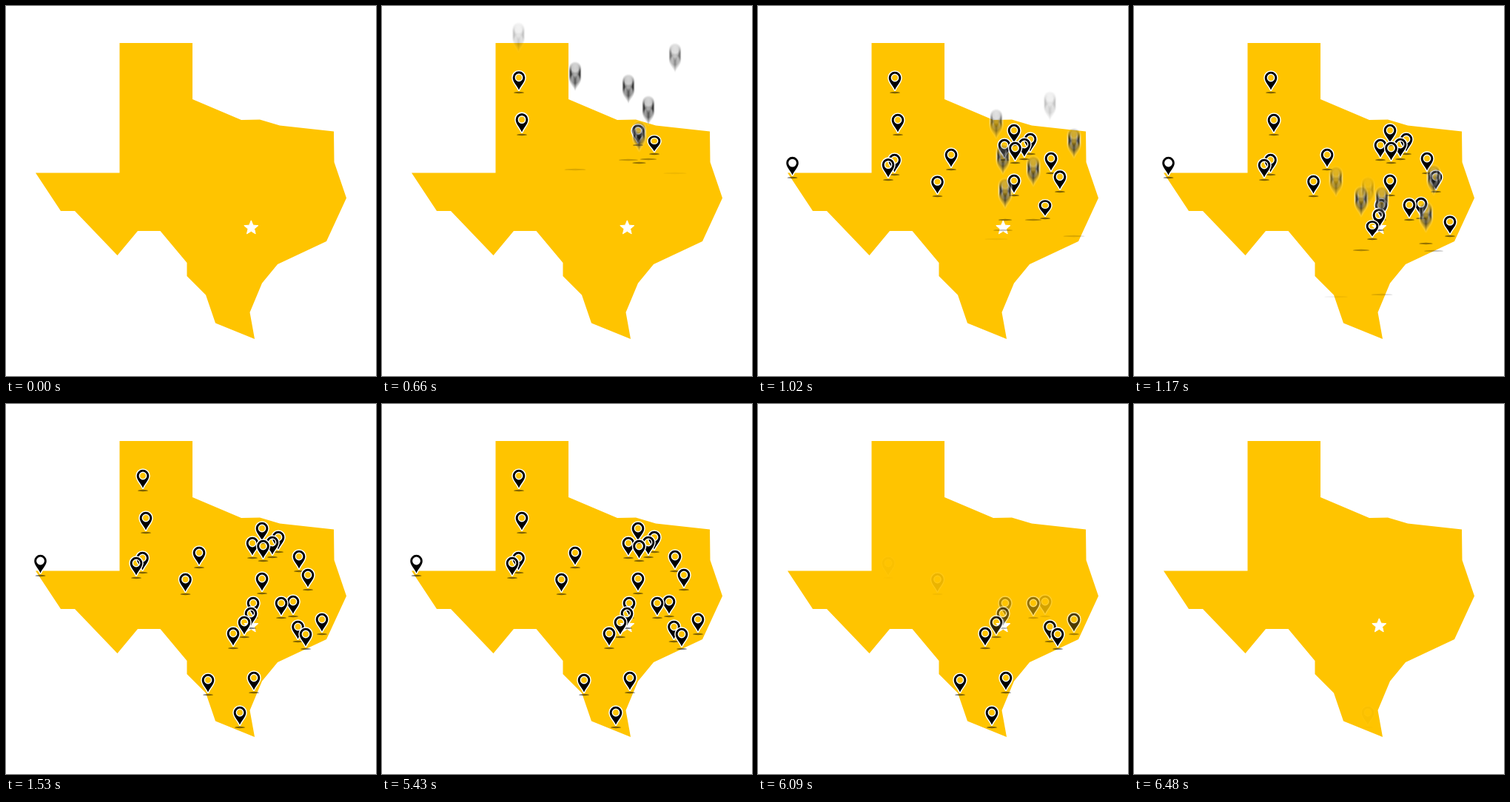
An HTML page with a canvas for the animation above (7200 ms loop, 500 by 500 pixels).

```html
<!DOCTYPE html>
<html lang="en">
<head>
<meta charset="utf-8">
<title>Map pins</title>
<style>
  html, body { margin: 0; width: 100%; height: 100%; overflow: hidden; background: #fff; }
  svg, canvas { position: absolute; left: 0; top: 0; width: 500px; height: 500px; display: block; }
</style>
</head>
<body>
<svg viewBox="0 0 500 500">
  <path fill="#ffc400" d="M153.5 50H252V126L318 154L343 153.5L370 161.5L443 169.5L443.5 211L460 259.5L433 318L367 349L346 374.5L329.5 414L336 450L283 428.5L270 390.5L244.5 365V347L208.5 304H178L150.5 337L93 277H74L40 225.5H153.5Z"/>
  <path id="star" fill="#fff" stroke="#fff" stroke-width="1" stroke-linejoin="round"/>
</svg>
<canvas id="stage"></canvas>
<script>
const LOOP = 7200, STEP = 30;
const SHOW = 17, LAND = 19, FADE = 180, LAST = 216;  // in steps
const FADE_STEPS = 11, SPEED = 30, SAMPLES = 15, TIP = 17;

// head centres in landing order
const pins = [
  [185, 97], [189, 154], [346, 168], [368, 180], [347.5, 192], [360, 187], [333, 188],
  [261, 201], [396, 206], [184.5, 208], [46.5, 212], [346, 236], [408, 231], [176, 215],
  [242.5, 237], [388, 267], [334, 269], [372, 269], [331, 283], [427, 291], [322, 295],
  [394.5, 301], [307, 310], [405, 311], [335, 370], [273, 373], [316, 417]
].map(([x, y], i) => ({ x, y, i }));
const layers = [...pins].sort((a, b) => a.y - b.y);

const dpr = window.devicePixelRatio || 1;
const shape = new Path2D(
  "M0 16.5C-2.4 10.5-8.3 6.2-8.3 0A8.3 8.3 0 0 1 8.3 0C8.3 6.2 2.4 10.5 0 16.5Z" +
  "M5.4 0A5.4 5.4 0 1 0-5.4 0A5.4 5.4 0 1 0 5.4 0Z");

function setup(canvas, w, h, scale) {
  canvas.width = w * scale;
  canvas.height = h * scale;
  const c = canvas.getContext("2d");
  c.scale(scale, scale);
  c.imageSmoothingQuality = "high";
  return c;
}

const ctx = setup(document.getElementById("stage"), 500, 500, dpr);
const buf = setup(document.createElement("canvas"), 500, 500, dpr);
const sprite = setup(document.createElement("canvas"), 32, 40, 2);

function drawPin(c, x, y, stretch = 1) {
  c.save();
  c.translate(x, y + TIP);
  c.scale(1, stretch);
  c.translate(0, -TIP);
  c.lineWidth = 3;
  c.lineJoin = "round";
  c.strokeStyle = "#fff";
  c.stroke(shape);
  c.fillStyle = "#000";
  c.fill(shape, "evenodd");
  c.restore();
}

function drawShadow(c, x, y, rx, alpha) {
  c.fillStyle = `rgba(0,0,0,${alpha})`;
  c.beginPath();
  c.ellipse(x, y + 20, rx, 1.2, 0, 0, Math.PI * 2);
  c.fill();
}

function pasteBuffer(alpha) {
  ctx.globalAlpha = alpha;
  ctx.drawImage(buf.canvas, 0, 0, 500, 500);
  ctx.globalAlpha = 1;
}

// u: steps left until landing
function drawFalling({ x, y }, u) {
  const rx = 7 + 2.4 * u - 0.12 * u * u;
  drawShadow(ctx, x, y, rx, Math.max(0, 0.5 * (1 - u / 5.6)));
  buf.clearRect(0, 0, 500, 500);
  buf.globalCompositeOperation = "lighter";
  buf.globalAlpha = 1 / SAMPLES;
  for (let s = 0; s < SAMPLES; s++) {
    const v = u + (s / (SAMPLES - 1) - 0.5) * 0.5;
    buf.drawImage(sprite.canvas, x - 16, y - 14 - SPEED * (v - 1 / 3), 32, 40);
  }
  buf.globalCompositeOperation = "source-over";
  buf.globalAlpha = 1;
  pasteBuffer(Math.min(1, (6.8 - u) / 2.6));
}

function bounce(n) {
  return n < 6 ? 1 - 0.14 * Math.exp(-0.6 * n) * Math.cos(1.2 * n) : 1;
}

function drawLanded(c, { x, y }, stretch) {
  drawShadow(c, x, y, 7, 0.5);
  drawPin(c, x, y, stretch);
}

function drawFading(pin, n) {
  buf.clearRect(0, 0, 500, 500);
  drawLanded(buf, pin, 1);
  pasteBuffer((1 + Math.cos(Math.PI * n / FADE_STEPS)) / 2);
}

function render(step) {
  ctx.clearRect(0, 0, 500, 500);
  if (step < SHOW) return;
  for (const pin of layers) {
    const u = LAND + pin.i - step;
    const n = step - FADE - pin.i;
    if (u > 6 || n >= FADE_STEPS) continue;
    if (u > 0) drawFalling(pin, u);
    else if (n > 0) drawFading(pin, n);
    else drawLanded(ctx, pin, bounce(-u));
  }
}

function starPath(cx, cy, r, inner) {
  const pts = Array.from({ length: 10 }, (_, k) => {
    const a = k * Math.PI / 5 - Math.PI / 2, d = k % 2 ? inner : r;
    return (cx + d * Math.cos(a)).toFixed(2) + " " + (cy + d * Math.sin(a)).toFixed(2);
  });
  return "M" + pts.join("L") + "Z";
}

document.getElementById("star").setAttribute("d", starPath(331.3, 299.8, 10, 4.5));
drawPin(sprite, 16, 14);

let shown = -1;
function tick(now) {
  const step = Math.min(LAST, Math.floor((now % LOOP) / STEP));
  if (step !== shown) render(shown = step);
  requestAnimationFrame(tick);
}
requestAnimationFrame(tick);
</script>
</body>
</html>
```
